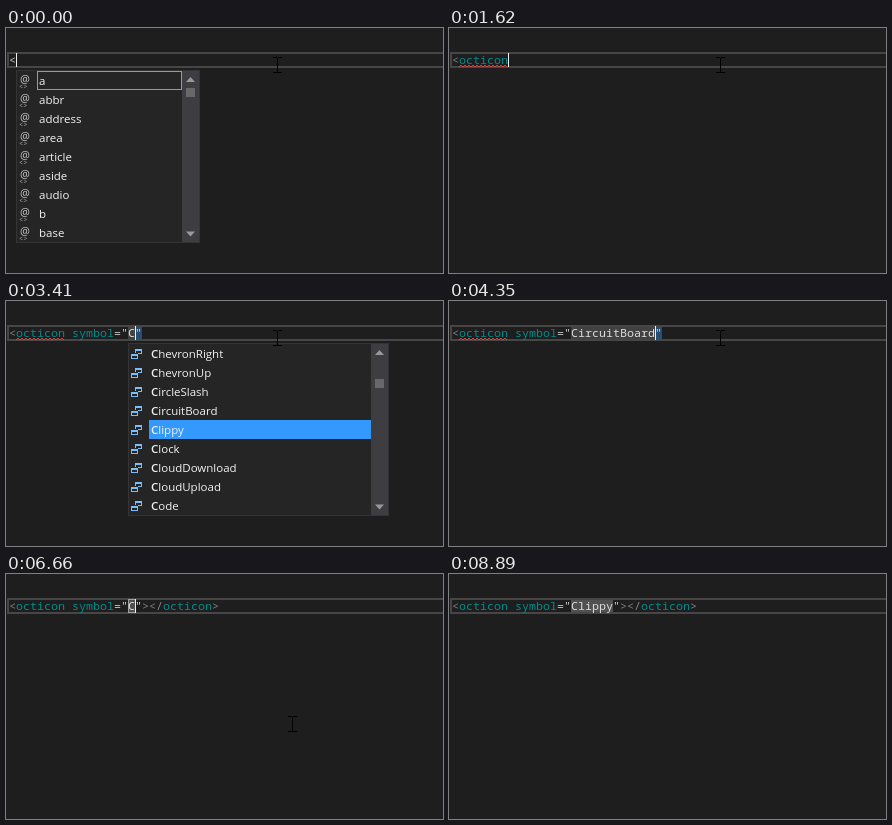
These frames come from a looping animation (437 px wide and 245 px high, 8.98 s). An HTML page with a canvas:

```html
<!DOCTYPE html>
<html lang="en">
<head>
<meta charset="utf-8">
<title>Tag completion</title>
<style>
html, body { margin: 0; width: 100%; height: 100%; overflow: hidden; background: #1e1e1e; }
canvas { display: block; width: 437px; height: 245px; }
</style>
</head>
<body>
<canvas id="stage"></canvas>
<script>
const W = 437, H = 245, LOOP = 8980;
const COL = 7, LEFT = 3, ROW = 19, LIST_TOP = 43;
const GREY = '#808080', LIGHT = '#c8c8c8', TEAL = '#008c8c', BLUE = '#569cd6';
const MONO = '"Noto Sans Mono", "DejaVu Sans Mono", monospace';
const UI = '"Open Sans", "Noto Sans", sans-serif';

const canvas = document.getElementById('stage');
const ctx = canvas.getContext('2d');
const dpr = window.devicePixelRatio || 1;
canvas.width = W * dpr;
canvas.height = H * dpr;
ctx.scale(dpr, dpr);

const tagList = (items, extra) => ({ x: 10, w: 184, icon: 'tag', items, sel: 0, ...extra });
const attrList = (items, sel) => ({ x: 66, w: 90, icon: 'tag', items, sel });
const enumList = (items, sel, extra) => ({ x: 122, w: 261, icon: 'enum', items, sel, ...extra });

const allTags = tagList(['a', 'abbr', 'address', 'area', 'article', 'aside', 'audio', 'b', 'base'],
  { outline: true, thumb: 60 });
const oTags = tagList(['object', 'octicon', 'octicon-sprite-sheet', 'ol', 'optgroup', 'option', 'output']);
const octTags = tagList(['octicon', 'octicon-sprite-sheet']);
const sAttrs = attrList(['spellcheck', 'style', 'symbol'], 0);
const allSymbols = enumList(['Alert', 'ArrowDown', 'ArrowLeft', 'ArrowRight', 'ArrowSmallDown',
  'ArrowSmallLeft', 'ArrowSmallRight', 'ArrowSmallUp', 'ArrowUp'], 0, { outline: true, thumb: 60 });
const cSymbols = enumList(['ChevronRight', 'ChevronUp', 'CircleSlash', 'CircuitBoard', 'Clippy',
  'Clock', 'CloudDownload', 'CloudUpload', 'Code'], 4, { thumb: 78, bold: 1 });
const circSymbols = (sel, bold) => enumList(['CircleSlash', 'CircuitBoard'], sel, { bold });
const clSymbols = enumList(['Clippy', 'Clock', 'CloudDownload', 'CloudUpload'], 0, { bold: 2 });
const clippy = bold => enumList(['Clippy'], 0, { bold });

// Each entry changes the editor state from its time on.
const steps = [
  [0, { tag: '', known: false, attr: '', value: null, closed: false, auto: false, squiggle: false,
        caret: 1, blink: 1, list: allTags, mouse: [271, 37] }],
  [150, { tag: 'o', caret: 2 }],
  [230, { list: oTags }],
  [390, { tag: 'oc', caret: 3, list: octTags }],
  [620, { tag: 'oct', caret: 4 }],
  [780, { tag: 'octi', caret: 5 }],
  [1010, { tag: 'octic', caret: 6 }],
  [1240, { tag: 'octico', caret: 7 }],
  [1320, { tag: 'octicon', caret: 8 }],
  [1550, { list: null }],
  [1620, { known: true, squiggle: true }],
  [1790, { caret: 9 }],
  [2480, { attr: 's', caret: 10, list: sAttrs }],
  [2640, { attr: 'sy', caret: 11, list: attrList(['symbol'], 0) }],
  [2790, { attr: 'sym', caret: 12 }],
  [2940, { attr: 'symbol', caret: 15, list: null }],
  [3270, { value: '', auto: true, caret: 17 }],
  [3340, { list: allSymbols }],
  [3410, { value: 'C', caret: 18, list: cSymbols }],
  [3570, { value: 'Ci', caret: 19, list: circSymbols(0, 2) }],
  [3720, { value: 'Cir', caret: 20, list: circSymbols(0, 3) }],
  [3880, { value: 'Circ', caret: 21, list: circSymbols(0, 4) }],
  [4120, { list: circSymbols(1, 4) }],
  [4350, { value: 'CircuitBoard', caret: 29, list: null }],
  [4670, { blink: 0.5 }],
  [4730, { blink: 0 }],
  [5130, { blink: 1 }],
  [5210, { caret: 30, auto: false }],
  [5670, { closed: true, squiggle: false, caret: 31 }],
  [5820, { mouse: [274, 62] }],
  [5970, { mouse: [279, 98] }],
  [6050, { mouse: [283, 128] }],
  [6130, { mouse: [286, 145] }],
  [6200, { mouse: [286, 150], caret: 29 }],
  [6590, { value: '', caret: 17 }],
  [6660, { value: 'C', caret: 18, boxed: true }],
  [6740, { list: cSymbols }],
  [6970, { value: 'Cl', caret: 19, list: clSymbols }],
  [7120, { value: 'Cli', caret: 20, list: clippy(3) }],
  [7430, { value: 'Clippy', caret: 23, list: null }],
  [8130, { mouse: [300, 188] }],
  [8210, { mouse: [332, 232], blink: 0 }],
  [8280, { mouse: null }],
  [8740, { blink: 1 }],
  [8890, { blink: 0 }]
];

function stateAt(t) {
  const state = {};
  for (const [at, change] of steps) {
    if (at > t) break;
    Object.assign(state, change);
  }
  return state;
}

function box(x, y, w, h, color) {
  ctx.fillStyle = color;
  ctx.fillRect(x, y, w, h);
}

function frame(x, y, w, h, color) {
  ctx.strokeStyle = color;
  ctx.lineWidth = 1;
  ctx.strokeRect(x + 0.5, y + 0.5, w - 1, h - 1);
}

function text(str, x, y, color, font) {
  ctx.font = font;
  ctx.fillStyle = color;
  ctx.fillText(str, x, y);
  return x + ctx.measureText(str).width;
}

function triangle(x, y, dir) {
  ctx.fillStyle = '#999999';
  ctx.beginPath();
  ctx.moveTo(x - 4.5, y + 2.5 * dir);
  ctx.lineTo(x + 4.5, y + 2.5 * dir);
  ctx.lineTo(x, y - 2.5 * dir);
  ctx.fill();
}

function drawCode(s) {
  let col = 0;
  const put = (str, color, weight = 400) => {
    text(str, LEFT + col * COL, 36, color, `${weight} 11.667px ${MONO}`);
    col += str.length;
  };
  const shade = (n, color) => box(LEFT + col * COL, 26, n * COL, 12, color);

  put('<', s.tag ? GREY : LIGHT);
  put(s.tag, s.known ? TEAL : BLUE);
  if (s.attr) {
    col++;
    put(s.attr, s.value === null ? LIGHT : TEAL);
  }
  if (s.value !== null) {
    put('="', LIGHT);
    const n = s.value.length;
    shade(n, s.boxed ? '#505050' : '#414141');
    if (s.boxed && n === 1) frame(LEFT + col * COL, 25, COL + 1, 14, '#a0a0a0');
    put(s.value, '#dcdcdc');
    if (s.auto) shade(1, '#264f78');
    put('"', LIGHT);
  }
  if (s.closed) {
    put('></', GREY);
    put('octicon', TEAL);
    put('>', GREY);
  }
  if (s.squiggle) drawSquiggle(10, 59);
}

function drawSquiggle(from, to) {
  ctx.strokeStyle = '#e8433c';
  ctx.lineWidth = 1;
  ctx.beginPath();
  for (let x = from, i = 0; x <= to; x += 2, i++) ctx.lineTo(x, i % 2 ? 37.2 : 39);
  ctx.stroke();
}

function tagIcon(x, y) {
  text('@', x + 4, y + 12, LIGHT, `11px ${UI}`);
  text('<>', x + 3, y + 18, '#a8a8a8', `7px ${MONO}`);
}

function enumIcon(x, y) {
  const blue = '#75bfff';
  frame(x + 7, y + 5, 7, 5, blue);
  box(x + 7, y + 5, 7, 2, blue);
  box(x + 3, y + 9, 7, 6, '#252526');
  frame(x + 3, y + 10, 7, 5, blue);
  box(x + 3, y + 10, 7, 2, blue);
}

function drawList({ x, w, icon, items, sel, outline, thumb, bold = 0 }) {
  const h = items.length * ROW + 2;
  const inner = thumb ? w - 18 : w - 1;
  box(x, LIST_TOP - 1, w, h, '#252526');
  frame(x, LIST_TOP - 1, w, h, '#343437');

  items.forEach((item, i) => {
    const y = LIST_TOP + i * ROW;
    if (i === sel) {
      if (outline) frame(x + 21, y, inner - 21, ROW, '#999999');
      else box(x + 21, y, inner - 21, ROW, '#3399ff');
    }
    (icon === 'tag' ? tagIcon : enumIcon)(x, y);
    const next = text(item.slice(0, bold), x + 23, y + 14, '#f1f1f1', `600 11.5px ${UI}`);
    text(item.slice(bold), next, y + 14, '#f1f1f1', `11.5px ${UI}`);
  });

  if (thumb) {
    const bar = x + w - 18;
    box(bar, LIST_TOP, 17, h - 2, '#3e3e42');
    triangle(bar + 8.5, LIST_TOP + 8.5, 1);
    triangle(bar + 8.5, LIST_TOP + h - 10, -1);
    box(bar + 4, thumb, 9, 9, '#686868');
  }
}

function drawMouse([x, y]) {
  box(x, y - 7, 1, 15, '#000');
  for (const edge of [y - 8, y + 7]) {
    box(x - 4, edge, 4, 1, '#000');
    box(x + 1, edge, 4, 1, '#000');
  }
}

function draw(t) {
  const s = stateAt(t);
  box(0, 0, W, H, '#1e1e1e');
  ctx.strokeStyle = '#464646';
  ctx.lineWidth = 2;
  ctx.strokeRect(2, 25, W + 4, 14);
  drawCode(s);
  ctx.globalAlpha = s.blink;
  box(LEFT + s.caret * COL, 25, 1, 14, '#f0f0f0');
  ctx.globalAlpha = 1;
  if (s.list) drawList(s.list);
  if (s.mouse) drawMouse(s.mouse);
}

const start = performance.now();
function tick() {
  draw((performance.now() - start) % LOOP);
  requestAnimationFrame(tick);
}
tick();
</script>
</body>
</html>
```
